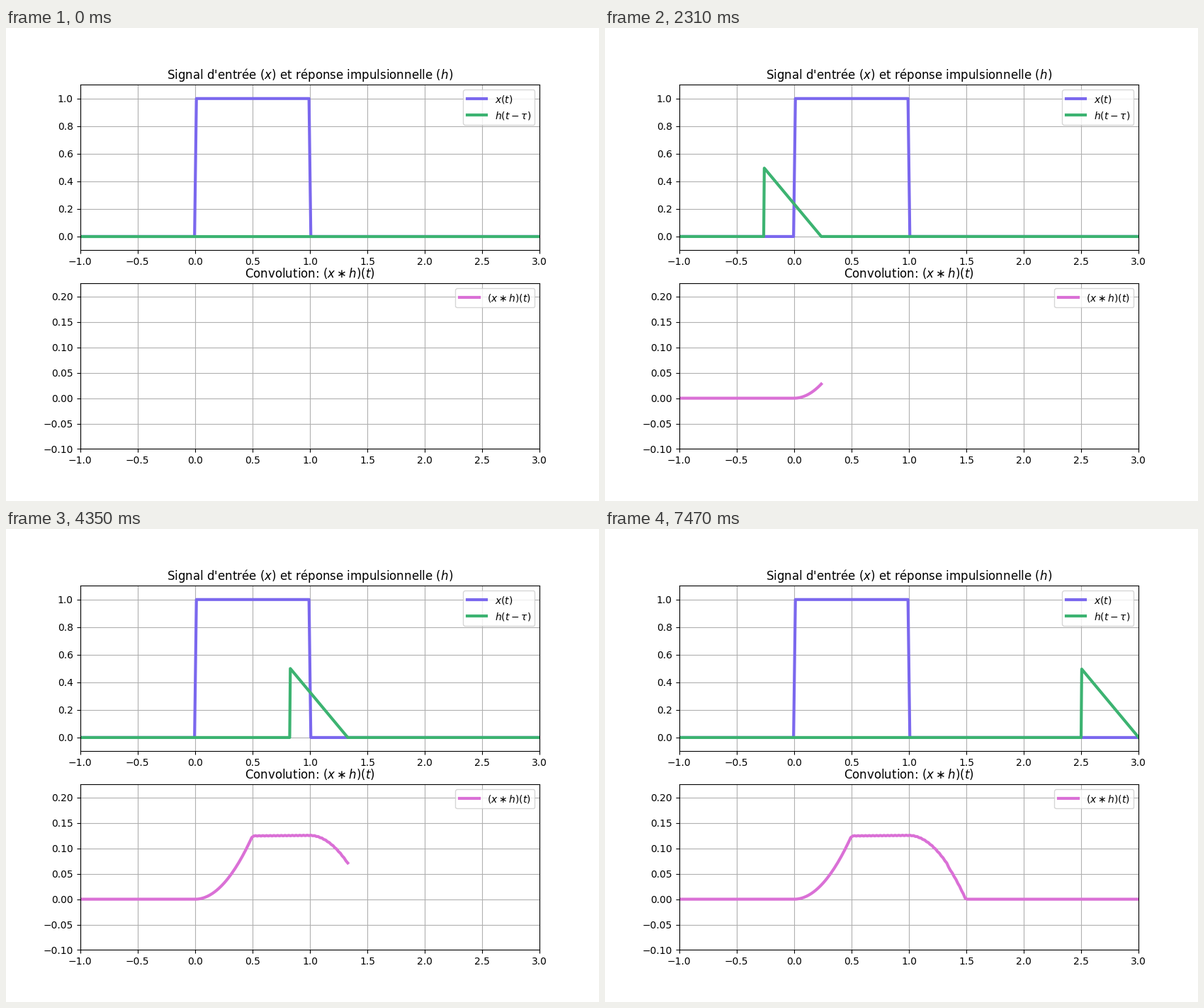
Animation, 837 px wide and 669 px high, one loop 7.5 s. Source, as a matplotlib script:

```python
import numpy as np
import matplotlib.pyplot as plt
from matplotlib.animation import FuncAnimation

W, H, DPI = 837, 669, 100
FRAMES, STEP_MS = 250, 30
EPS = 1e-9

t = np.linspace(-1, 3, FRAMES)
tau = np.linspace(-1, 3, 3 * FRAMES + 1)


def x(u):
    """Unit pulse on [0, 1)."""
    return np.where((u >= 0) & (u < 1 - EPS), 1.0, 0.0)


def h(u):
    """Ramp on [0, 0.5]."""
    return np.where((u >= 0) & (u <= 0.5), u, 0.0)


def simpson(y, dx):
    return dx / 3 * (y[0] + 4 * y[1:-1:2].sum() + 2 * y[2:-1:2].sum() + y[-1])


x_tau = x(tau)
conv = np.array([simpson(x_tau * h(s - tau), tau[1] - tau[0]) for s in t])

plt.rcParams["font.family"] = "DejaVu Sans"
# The small margin keeps the pixel size from being truncated.
size = ((W + 0.01) / DPI, (H + 0.01) / DPI)
fig, (top, bottom) = plt.subplots(2, 1, figsize=size, dpi=DPI)

top.plot(t, x(t), color="mediumslateblue", lw=3, label="$x(t)$")
h_line, = top.plot([], [], color="mediumseagreen", lw=3, label=r"$h(t-\tau)$")
top.set_title("Signal d'entrée ($x$) et réponse impulsionnelle ($h$)")
top.set_ylim(-0.1, 1.1)

conv_line, = bottom.plot([], [], color="orchid", lw=3, label=r"$(x \ast h)(t)$")
bottom.set_title(r"Convolution: $(x \ast h)(t)$")
bottom.set_ylim(conv.min() - 0.1, conv.max() + 0.1)

for ax in (top, bottom):
    ax.set_xlim(-1, 3)
    ax.grid(True)
    ax.legend(loc="upper right")


def update(i):
    h_line.set_data(tau, h(t[i] - tau))
    conv_line.set_data(t[:i + 1], conv[:i + 1])
    return h_line, conv_line


anim = FuncAnimation(fig, update, frames=FRAMES, interval=STEP_MS,
                     repeat=True, repeat_delay=0, blit=False)
plt.show()
```
